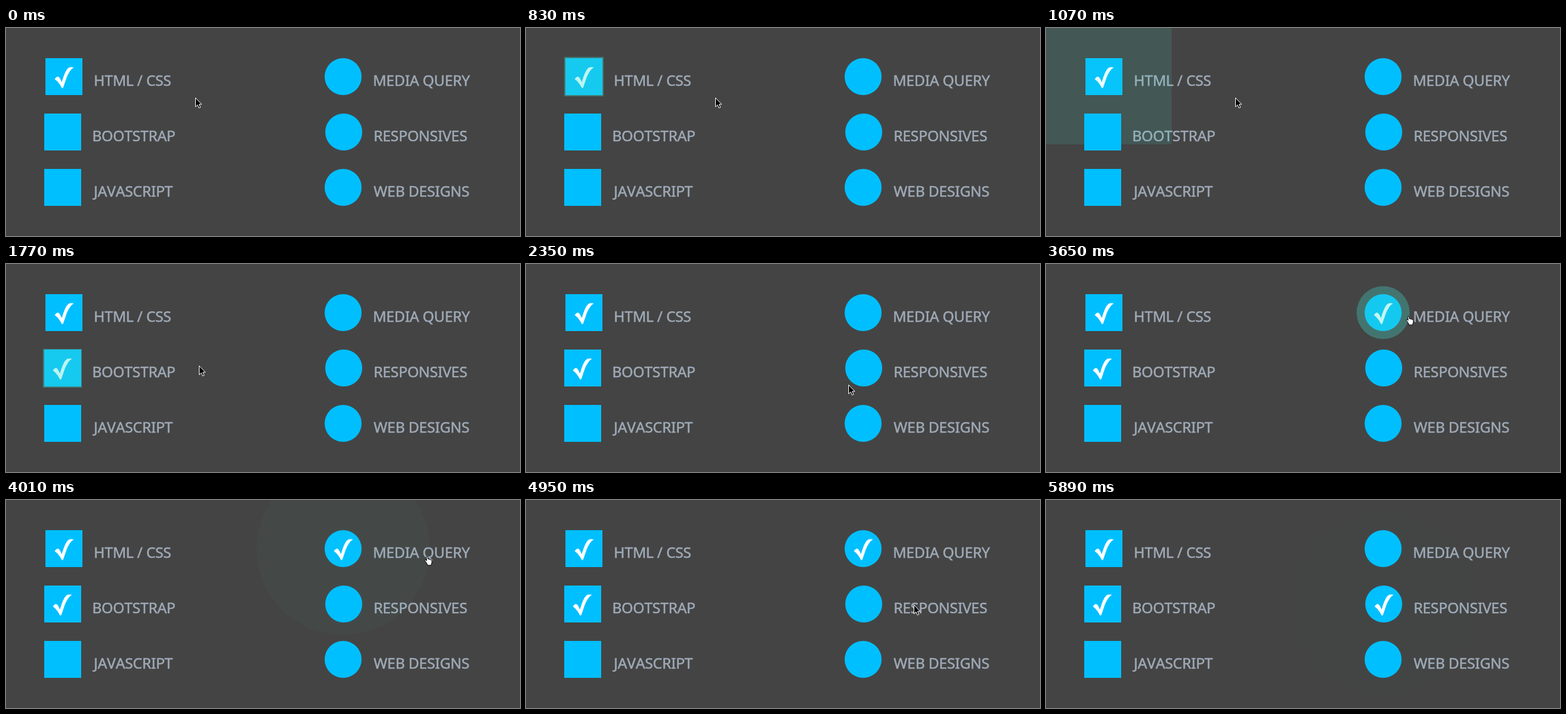
An HTML page with a canvas for the animation above (6250 ms loop, 834 px wide and 338 px high).

```html
<!DOCTYPE html>
<html lang="en">
<head>
<meta charset="utf-8">
<title>Checkboxes and radio buttons</title>
<style>
  html, body { margin: 0; width: 100%; height: 100%; overflow: hidden; background: #444; }
  canvas { display: block; }
</style>
</head>
<body>
<canvas id="stage" width="834" height="338"></canvas>
<script>
const ctx = document.getElementById('stage').getContext('2d');
const LOOP = 6250, STEP = 117.7, WAVE = 650;

// "on" holds the [from, to] spans in ms during which an option is checked
const options = [
  { label: 'HTML / CSS', x: 94, y: 79, textX: 142.6, on: [[-WAVE, 806], [806, LOOP]] },
  { label: 'BOOTSTRAP', x: 91.5, y: 169, textX: 139.8, on: [[1751, LOOP]] },
  { label: 'JAVASCRIPT', x: 91.5, y: 259, textX: 142.5, on: [] },
  { label: 'MEDIA QUERY', x: 547, y: 79, textX: 595.4, round: true, on: [[3578, 5355]] },
  { label: 'RESPONSIVES', x: 548, y: 169, textX: 596.4, round: true, on: [[2705, 3578], [5355, LOOP]] },
  { label: 'WEB DESIGNS', x: 547, y: 259, textX: 596.6, round: true, on: [] },
];

// Pointer stops: step, x, y
const stops = [
  [0, 307, 113], [10, 307, 113], [12, 304, 135], [14, 313, 165], [18, 313, 165],
  [20, 523, 196], [22, 545, 187], [25, 545, 190], [26, 545, 190], [29, 552, 82],
  [30, 552, 82], [34, 679, 91], [36, 679, 91], [42, 629, 170], [45, 545, 186],
  [48, 544, 186], [49, 632, 264],
];

const check = new Path2D('M-15 4Q-12 0-10 0Q-7 0-3.5 9Q1.5-8.5 6-13Q9-16.5 16-15Q9.5-11 4.5 1Q1.5 10-1.5 18.5H-3.5Q-8 9-15 4Z');
const arrow = new Path2D('M.5.5V15L3.8 11.8L6.2 17L8.6 16L6.3 11H10.5Z');
const hand = new Path2D('M2.5 10L.6 7.6Q.2 6 2 6.4L3.6 7.6L2.9 1.6Q3.8 0 5 1.6L5.8 5Q7 4.2 7.8 5.5Q9 4.8 10 6.2Q11.6 5.7 12 7.5V11Q11 13 11 15H5Q4.6 13 2.5 10Z');

// CSS "ease": cubic-bezier(.25, .1, .25, 1)
function ease(time) {
  const bezier = (a, b, s) => 3 * (1 - s) ** 2 * s * a + 3 * (1 - s) * s * s * b + s ** 3;
  let low = 0, high = 1;
  for (let i = 0; i < 20; i++) {
    const mid = (low + high) / 2;
    if (bezier(.25, .25, mid) < time) low = mid; else high = mid;
  }
  return bezier(.1, 1, low);
}

function fillShape({ x, y, round }, radius, color) {
  ctx.fillStyle = color;
  ctx.beginPath();
  if (round) {
    ctx.arc(x, y, radius, 0, 2 * Math.PI);
  } else {
    const size = Math.round(2 * radius);
    ctx.rect(Math.round(x - radius), Math.round(y - radius), size, size);
  }
  ctx.fill();
}

function drawOption(option, time) {
  fillShape(option, 30, '#00bfff');
  const span = option.on.find(([from, to]) => time >= from && time < to);
  if (!span) return;
  ctx.save();
  ctx.translate(Math.floor(option.x), option.y);
  ctx.fillStyle = '#fff';
  ctx.fill(check);
  ctx.restore();
  const elapsed = (time - span[0]) / WAVE;
  if (elapsed >= 1) return;
  const progress = ease(elapsed);
  ctx.globalAlpha = .35 * (1 - progress);
  fillShape(option, 30 + 120 * progress, '#40e0d0');
  ctx.globalAlpha = 1;
}

function drawLabels() {
  ctx.font = '24px "Noto Sans", sans-serif';
  ctx.fontKerning = 'none';
  ctx.letterSpacing = '-0.3px';
  ctx.fillStyle = ctx.strokeStyle = '#9faab7';
  ctx.lineWidth = .5;
  for (const { label, textX, y } of options) {
    ctx.fillText(label, textX, y + 15);
    ctx.strokeText(label, textX, y + 15);
  }
}

function drawPointer(step) {
  const next = stops.findIndex(stop => stop[0] >= step);
  if (next < 0) return;
  const b = stops[next], a = stops[Math.max(0, next - 1)];
  const part = (step - a[0]) / (b[0] - a[0] || 1);
  const isHand = (step > 20 && step < 37) || (step > 43 && step < 49);
  const shape = isHand ? hand : arrow;
  ctx.save();
  ctx.translate(Math.round(a[1] + (b[1] - a[1]) * part), Math.round(a[2] + (b[2] - a[2]) * part));
  ctx.lineWidth = 1;
  ctx.fillStyle = isHand ? '#fff' : '#000';
  ctx.strokeStyle = isHand ? '#000' : '#fff';
  ctx.fill(shape);
  ctx.stroke(shape);
  ctx.restore();
}

function draw(now) {
  let step = Math.floor((now % LOOP + 10) / STEP);
  if (step > 34 && step < 37) step = 34; // the picture rests here
  ctx.fillStyle = '#444';
  ctx.fillRect(0, 0, 834, 338);
  drawLabels();
  for (const option of options) drawOption(option, step * STEP);
  drawPointer(step);
}

const start = performance.now();
function tick() {
  draw(performance.now() - start);
  requestAnimationFrame(tick);
}
tick();
</script>
</body>
</html>
```
